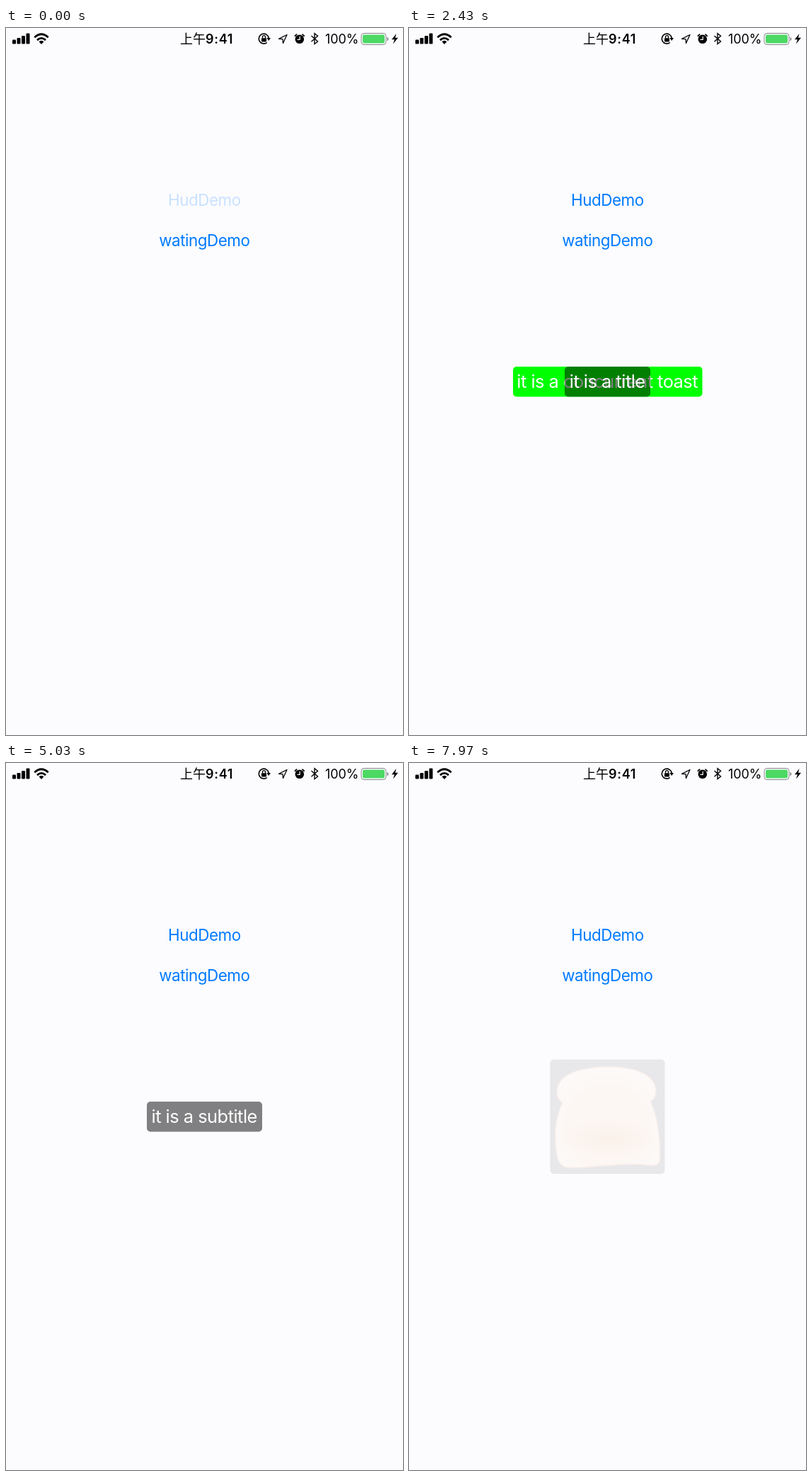
These frames come from a looping animation (561 by 998 pixels, 8 s). An HTML page:

```html
<!DOCTYPE html>
<html lang="zh">
<head>
<meta charset="utf-8">
<title>Toast demo</title>
<style>
  html, body { margin: 0; width: 100%; height: 100%; overflow: hidden; background: #fcfcff; }
  svg { display: block; width: 100%; height: 100%; }
  text { font-family: Inter, Roboto, sans-serif; }
  .button { font-size: 22.4px; letter-spacing: -.46px; fill: #007aff; text-anchor: middle; }
  .toast text { font-size: 25.4px; letter-spacing: -.5px; fill: #fff; text-anchor: middle; }
  .status { font-size: 18px; }
  .line { fill: none; stroke: #000; stroke-width: 1.6; }
  .shade { fill: #000; fill-opacity: .5; }
</style>
</head>
<body>
<svg viewBox="0 0 561 998">
  <defs>
    <radialGradient id="crumb" cx=".5" cy=".6" r=".62">
      <stop offset="0" stop-color="#ffdcae"/>
      <stop offset=".6" stop-color="#ffdfb8"/>
      <stop offset="1" stop-color="#fff0dc"/>
    </radialGradient>
    <radialGradient id="toasted">
      <stop offset="0" stop-color="#f2b679"/>
      <stop offset="1" stop-color="#f2b679" stop-opacity="0"/>
    </radialGradient>
  </defs>

  <!-- signal and wifi -->
  <rect x="9" y="16.5" width="5" height="6" rx="1.2"/>
  <rect x="15.5" y="14" width="5" height="8.5" rx="1.2"/>
  <rect x="22" y="11" width="5" height="11.5" rx="1.2"/>
  <rect x="28.5" y="7.5" width="5" height="15" rx="1.2"/>
  <path class="line" style="stroke-width:2.8" d="M40.3 13.3Q50 4.3 59.7 13.3M44 17.1Q50 11.6 56 17.1"/>
  <path d="M46.5 19.3Q50 16.2 53.5 19.3L50 23Z"/>

  <!-- clock -->
  <text class="status" x="246" y="21.8" style="font-family:'Noto Sans CJK SC','Noto Sans CJK',sans-serif;font-weight:500">上午</text>
  <text class="status" x="282" y="21.8" font-weight="600" letter-spacing=".7">9:41</text>

  <!-- rotation lock -->
  <path class="line" d="M368.8 20.5A7 7 0 1 1 371.2 14"/>
  <path d="M368.3 14H374L371.2 18Z"/>
  <rect x="361" y="14.2" width="7" height="5.3" rx=".8"/>
  <path class="line" style="stroke-width:1.3" d="M362.5 14.5V12.7a2 2 0 0 1 4 0V14.5"/>

  <!-- location -->
  <path class="line" style="stroke-width:1.3;stroke-linejoin:round" d="M385.5 15.3L397 9.5L391.5 21.5L391 15.6Z"/>

  <!-- alarm -->
  <circle cx="414.8" cy="15.8" r="6.3"/>
  <path class="line" style="stroke-width:1.8;stroke-linecap:round" d="M408.4 11.2L410.6 9.1M419 9.1L421.2 11.2"/>
  <path class="line" style="stroke:#fff;stroke-width:1.2" d="M415.2 11.8V16.3H411.5"/>

  <!-- bluetooth -->
  <path class="line" style="stroke-width:1.4" d="M431.5 11L440.5 19L436 22.5V7.8L440.5 11.3L431.5 19.3"/>

  <!-- battery -->
  <text class="status" x="451" y="21.8" letter-spacing="-.1">100%</text>
  <rect x="502" y="7.5" width="35" height="16" rx="4" fill="none" stroke="#858588"/>
  <rect x="504" y="9.5" width="31" height="12" rx="2.3" fill="#4cd964"/>
  <path d="M538.5 12.7Q540.5 13.2 540.5 15.5T538.5 18.3Z" fill="#858588"/>
  <path d="M551.5 8L545 16.3H549L547 22.5L554 13.8H550Z"/>

  <text class="button" id="hudButton" x="280.3" y="251">HudDemo</text>
  <text class="button" x="280.3" y="308">watingDemo</text>

  <g class="toast" id="concurrent">
    <rect x="147" y="478" width="267.5" height="42.5" rx="5" fill="#0f0"/>
    <text x="280.2" y="508">it is a concurrent toast</text>
  </g>
  <g class="toast" id="title">
    <rect class="shade" x="220" y="478" width="121" height="42.5" rx="5"/>
    <text x="280.2" y="508">it is a title</text>
  </g>
  <g class="toast" id="subtitle">
    <rect class="shade" x="199" y="478" width="163" height="42.5" rx="5"/>
    <text x="280.2" y="508">it is a subtitle</text>
  </g>
  <g class="toast" id="bread">
    <rect class="shade" x="199.5" y="418.5" width="162" height="161.5" rx="5"/>
    <path fill="url(#crumb)" stroke="#f3b487" stroke-width="1.5" d="M232 437C256 427 303 426 326 436C350 446 355 467 341 478C351 500 355 530 354 560Q353 569 342 568C300 562 265 572 225 571Q211 569 209 552C205 525 207 500 217 480C203 468 208 446 232 437Z"/>
    <ellipse cx="282" cy="530" rx="66" ry="26" fill="url(#toasted)"/>
  </g>
</svg>
<script>
const LOOP = 8000, FADE = 1250;
const toasts = [
  { id: 'concurrent', show: 170, hide: 2480 },
  { id: 'title', show: 170, hide: 2480 },
  { id: 'subtitle', show: 3900, hide: 6500 },
  { id: 'bread', show: 7660, hide: Infinity },
];

// Eased progress from 0 to 1
function ease(time, start, duration) {
  const x = Math.min(1, Math.max(0, (time - start) / duration));
  return x * x * (3 - 2 * x);
}

function setOpacity(id, value) {
  document.getElementById(id).style.opacity = value;
}

function draw(time) {
  setOpacity('hudButton', 0.2 + 0.8 * ease(time, 0, 470));
  for (const { id, show, hide } of toasts) {
    setOpacity(id, ease(time, show, FADE) - ease(time, hide, FADE));
  }
}

const startTime = performance.now();
function tick() {
  draw((performance.now() - startTime) % LOOP);
  requestAnimationFrame(tick);
}
tick();
</script>
</body>
</html>
```
